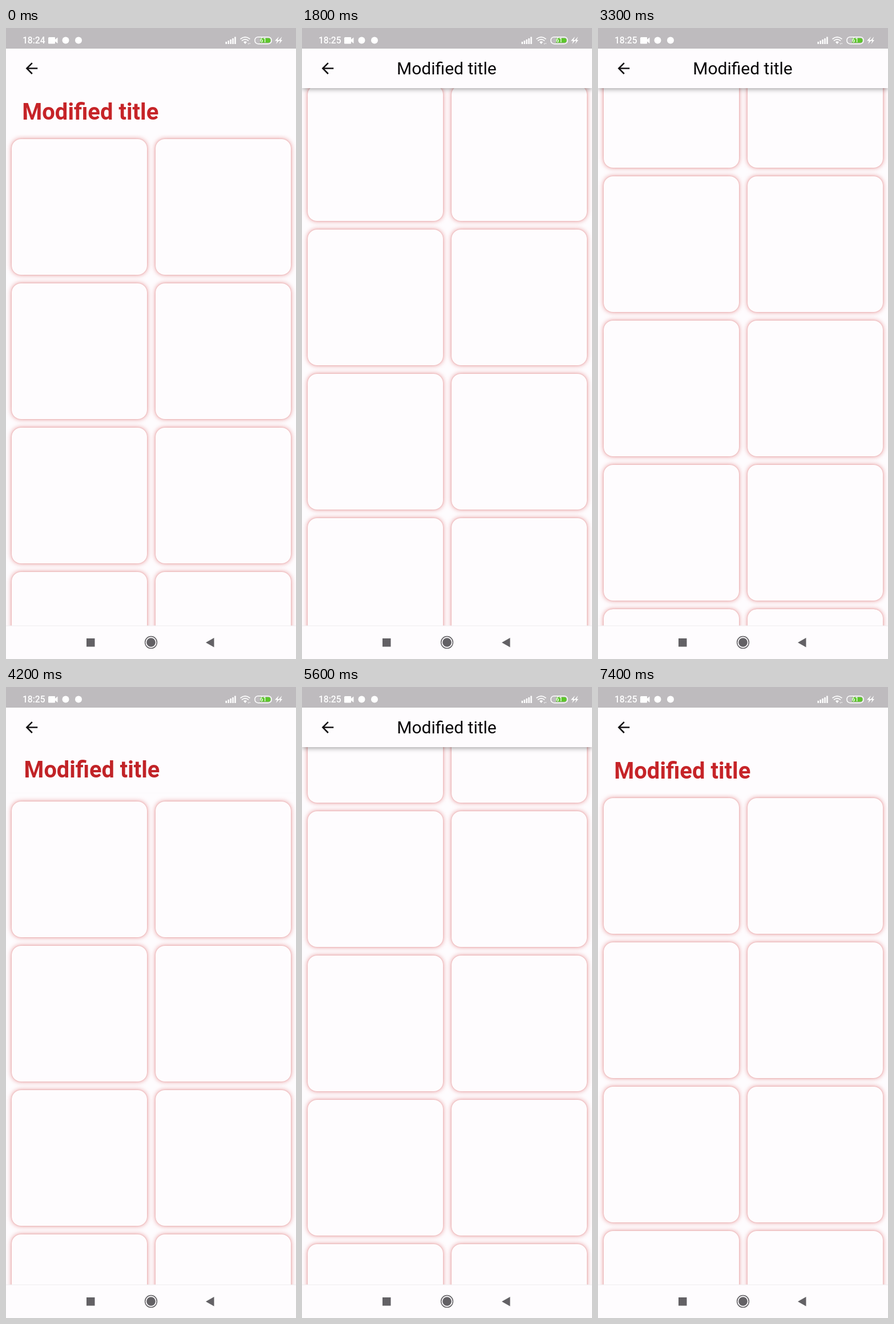
An HTML page that plays this animation: 508 px wide and 1102 px high, repeating every 7900 ms.

```html
<!DOCTYPE html>
<html lang="en">
<head>
<meta charset="utf-8">
<title>Collapsing title</title>
<style>
html, body { margin: 0; width: 100%; height: 100%; overflow: hidden; background: #fefcfe; }
body { position: relative; font-family: Roboto, sans-serif; }
#list, #header, svg { position: absolute; left: 0; top: 0; width: 508px; }
#list i {
  position: absolute; width: 237px; height: 237px; border-radius: 16px; background: #fefcfe;
  box-shadow: 0 0 9px rgba(215, 70, 70, .62), 0 0 1.5px rgba(190, 60, 60, .35);
}
#header { background: #fefcfe; }
svg { height: 1102px; }
</style>
</head>
<body>
<div id="list"></div>
<div id="header"></div>
<svg viewBox="0 0 508 1102">
  <rect width="508" height="36" fill="#bebbbe"/>
  <g fill="#fff">
    <text id="clock" x="29" y="27.3" font-size="15.6" font-weight="500">18:24</text>
    <path d="M75 16h10q1 0 1 1v3l4.500-3.500v10.500l-4.500-3.500v3q0 1-1 1h-10q-1 0-1-1v-9q0-1 1-1z"/>
    <circle cx="104.500" cy="21.500" r="6"/>
    <circle cx="127" cy="21.500" r="6"/>
    <path d="M384.500 24h2.500v4h-2.500zM388.500 22h2.500v6h-2.500zM392.400 20h2.500v8h-2.500zM396.300 18h2.500v10h-2.500zM400.200 15.500h2.500v12.500h-2.500z"/>
    <path d="M419 28l-3-3.500q3-2.500 6 0z"/>
    <path d="M478 15l-7 7.500h4l-2 5.500 6-7h-3.500zM483.500 15l-6.500 7.500h3.500l-2 5.500 5.500-7h-3z"/>
  </g>
  <g fill="none" stroke="#fff" stroke-width="1.7">
    <path d="M410.500 19.300q8.500-7 17 0M413 22.300q6-5 12 0"/>
    <path d="M424.500 26.500v2M427 26v2" stroke-width="1"/>
    <rect x="436" y="15.700" width="29" height="12" rx="5.500" stroke-width="1.500"/>
  </g>
  <path d="M445 17.700h14.500a4 4 0 0 1 0 8h-14.500z" fill="#5cc62b"/>
  <text x="450.500" y="25.300" font-size="10" font-weight="500" text-anchor="middle" fill="#fff">61</text>
  <path transform="translate(29.400 55) scale(1.294)" fill="#141214"
    d="M20 11H7.830l5.590-5.590L12 4l-8 8 8 8 1.410-1.410L7.830 13H20z"/>
  <text id="title">Modified title</text>
  <rect y="1044" width="508" height="58" fill="#fefcfe"/>
  <rect y="1043.500" width="508" height="1" fill="#efedef"/>
  <g fill="#636165">
    <rect x="141" y="1066" width="14.500" height="14.500"/>
    <circle cx="254" cy="1073" r="7.800"/>
    <circle cx="254" cy="1073" r="10.400" fill="none" stroke="#636165" stroke-width="1.500"/>
    <path d="M350 1073.200l14.500-8.200v16.400z"/>
  </g>
</svg>
<script>
const LOOP = 7900, STEP = 100;
// [time, scroll offset]; negative offsets are the bounce past the top
const scrollKeys = [
  [1310, 0], [1500, 20], [1800, 94], [2100, 133], [2500, 190], [2900, 215], [3050, 215],
  [3300, 187], [3500, 120], [3750, 0], [3950, -16], [4200, -6], [4500, 0], [4650, 0],
  [4900, 60], [5150, 190], [5400, 245], [5500, 243], [5600, 229], [5700, 190],
  [5870, 0], [6050, -14], [6200, -14], [6400, -9], [6800, 0]
];
const [list, header, title, clock] =
  ['list', 'header', 'title', 'clock'].map(id => document.getElementById(id));

for (let i = 0; i < 10; i++) {
  const card = list.appendChild(document.createElement('i'));
  card.style.left = 10 + i % 2 * 252 + 'px';
  card.style.top = 194 + Math.floor(i / 2) * 252 + 'px';
}

const lerp = (a, b, p) => a + (b - a) * p;

function slope(i) {
  const a = scrollKeys[i], b = scrollKeys[i + 1];
  return a && b ? (b[1] - a[1]) / (b[0] - a[0]) : 0;
}

function tangent(i) {
  const a = slope(i - 1), b = slope(i);
  return a * b > 0 ? 2 * a * b / (a + b) : 0;
}

// Smooth curve through the keys without overshoot
function scrollAt(t) {
  const i = scrollKeys.findIndex(k => k[0] > t) - 1;
  if (i < 0) return 0;
  const [t0, y0] = scrollKeys[i], [t1, y1] = scrollKeys[i + 1];
  const d = t1 - t0, u = (t - t0) / d, v = 1 - u;
  return v * v * (1 + 2 * u) * y0 + u * u * (1 + 2 * v) * y1
    + d * u * v * (v * tangent(i) - u * tangent(i + 1));
}

function ease(t, start) {
  const u = Math.min(1, Math.max(0, (t - start) / 500));
  return (1 - Math.cos(Math.PI * u)) / 2;
}

function draw(t) {
  const p = ease(t, 1310) - ease(t, 3750) + ease(t, 4720) - ease(t, 5870);
  list.style.transform = `translateY(${-Math.round(scrollAt(t))}px)`;
  header.style.height = lerp(186, 105, p) + 'px';
  header.style.boxShadow = `0 2px 8px rgba(0, 0, 0, ${.36 * p})`;
  title.setAttribute('x', lerp(28.2, 166.2, p));
  title.setAttribute('y', lerp(160, 80.5, p));
  title.setAttribute('font-size', lerp(40, 30, p));
  title.setAttribute('font-weight', Math.round(lerp(7, 4, p)) * 100);
  title.setAttribute('fill', `rgb(${lerp(198, 8, p)}, ${lerp(36, 6, p)}, ${lerp(40, 8, p)})`);
  clock.textContent = t < 1200 ? '18:24' : '18:25';
}

const began = performance.now();
function tick() {
  const t = (performance.now() - began) % LOOP;
  draw(Math.floor(t / STEP) * STEP);
  requestAnimationFrame(tick);
}
tick();
</script>
</body>
</html>
```
